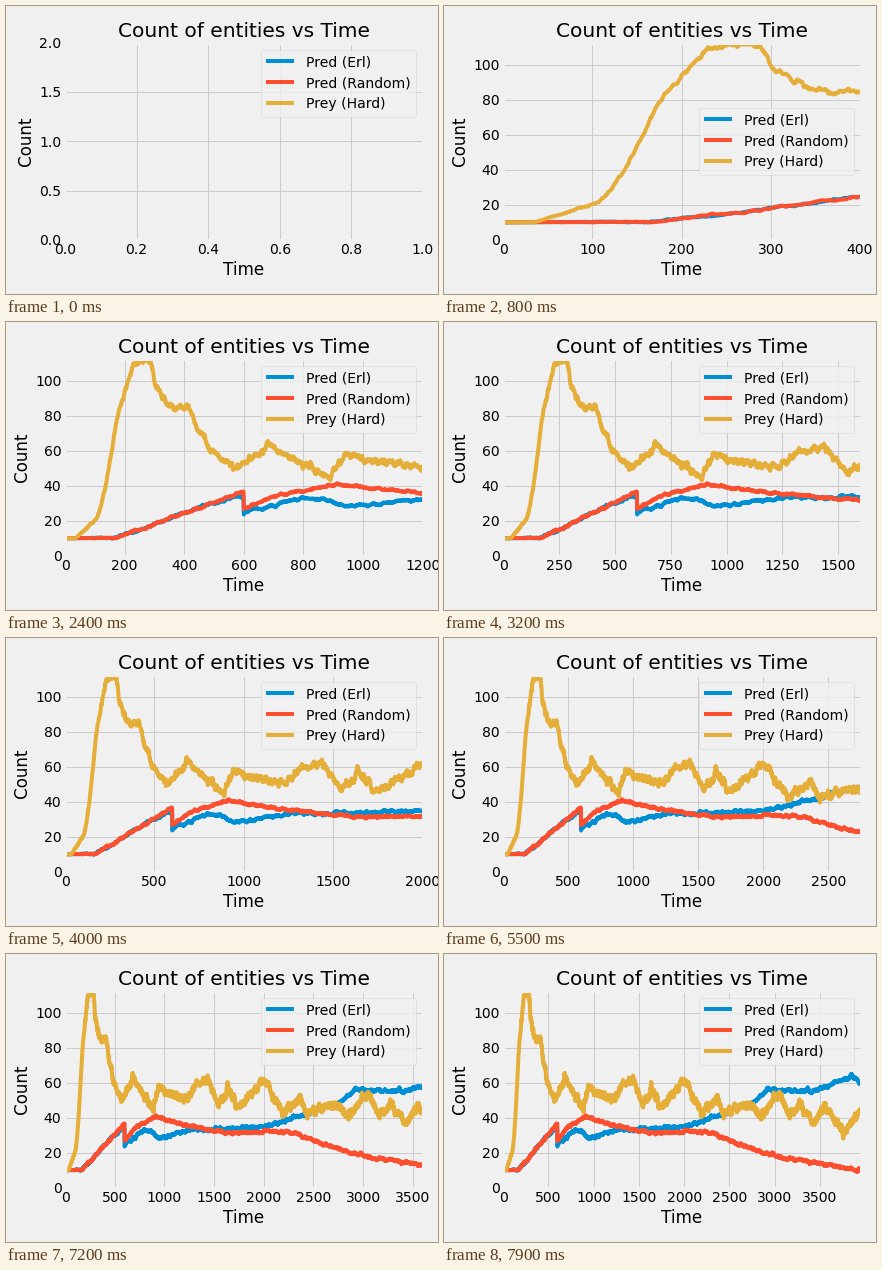
Recreate the animation shown at these times as a matplotlib script. Size 432 px wide and 288 px high, loop 8 s.

```python
import numpy as np
import matplotlib.pyplot as plt
from matplotlib.animation import FuncAnimation

W, H, DPI = 432, 288, 72
FRAMES, STEP = 80, 50
CAP = 111.8

plt.style.use("fivethirtyeight")
time = np.arange(FRAMES * STEP)


def wander(seed, size, keep):
    """Autocorrelated noise that fades in after the quiet start."""
    kicks = np.random.default_rng(seed).normal(0, size, len(time))
    noise = np.convolve(kicks, keep ** np.arange(100))[:len(time)]
    return noise * np.clip((time - 30) / 200, 0, 1)


def population(points, seed, size, keep):
    """Straight runs between (time, level) turning points, plus noise."""
    xs, ys = zip(*points)
    return np.interp(time, xs, ys) + wander(seed, size, keep)


# Both predators are culled at time 600
erl = population([(0, 10), (170, 10.5), (400, 24.5), (599, 35), (600, 25), (800, 34),
                  (950, 28.5), (1250, 33), (2000, 34.5), (2750, 48.5), (2920, 56),
                  (3400, 55), (3850, 64), (3950, 60)], 1, 0.18, 0.94)
rand = population([(0, 10), (170, 10.3), (400, 24.5), (599, 37), (600, 27), (720, 35),
                   (910, 40.5), (1200, 36.5), (1600, 31.5), (2250, 32.3), (2750, 22),
                   (3100, 17), (3950, 10)], 2, 0.15, 0.94)
prey = population([(0, 10), (35, 10), (110, 22), (135, 38), (170, 74), (230, 111.5),
                   (290, 109), (300, 100), (350, 85), (410, 84), (500, 57), (580, 50),
                   (690, 63), (890, 45), (935, 57), (1220, 50), (1330, 59), (1440, 63),
                   (1540, 46), (1640, 56), (1740, 46), (2000, 62), (2190, 42),
                   (2360, 52), (2430, 43), (2710, 48), (2870, 41), (3040, 55),
                   (3160, 41), (3280, 48), (3440, 37), (3550, 47), (3770, 32),
                   (3950, 44)], 3, 0.6, 0.88)
prey = np.minimum(prey, CAP)

series = {"Pred (Erl)": erl, "Pred (Random)": rand, "Prey (Hard)": prey}
peak = np.maximum.accumulate(np.max(list(series.values()), axis=0))

fig, ax = plt.subplots(figsize=(W / DPI, H / DPI), dpi=DPI)
fig.subplots_adjust(left=59 / W, right=416.9 / W, bottom=1 - 233.8 / H, top=1 - 36.6 / H)
lines = [ax.plot([], [], label=name)[0] for name in series]
ax.set(title="Count of entities vs Time", xlabel="Time", ylabel="Count")
ax.legend(loc="best")


def update(frame):
    end = frame * STEP
    count = end + 1 if frame else 0
    for line, values in zip(lines, series.values()):
        line.set_data(time[:count], values[:count])
    ax.set_xlim(0, end + 1)
    ax.set_ylim(0, peak[end] + 1 if frame else 2)
    return lines


anim = FuncAnimation(fig, update, frames=FRAMES, interval=100, init_func=lambda: lines,
                     repeat=True, repeat_delay=0, blit=False)
plt.show()
```
